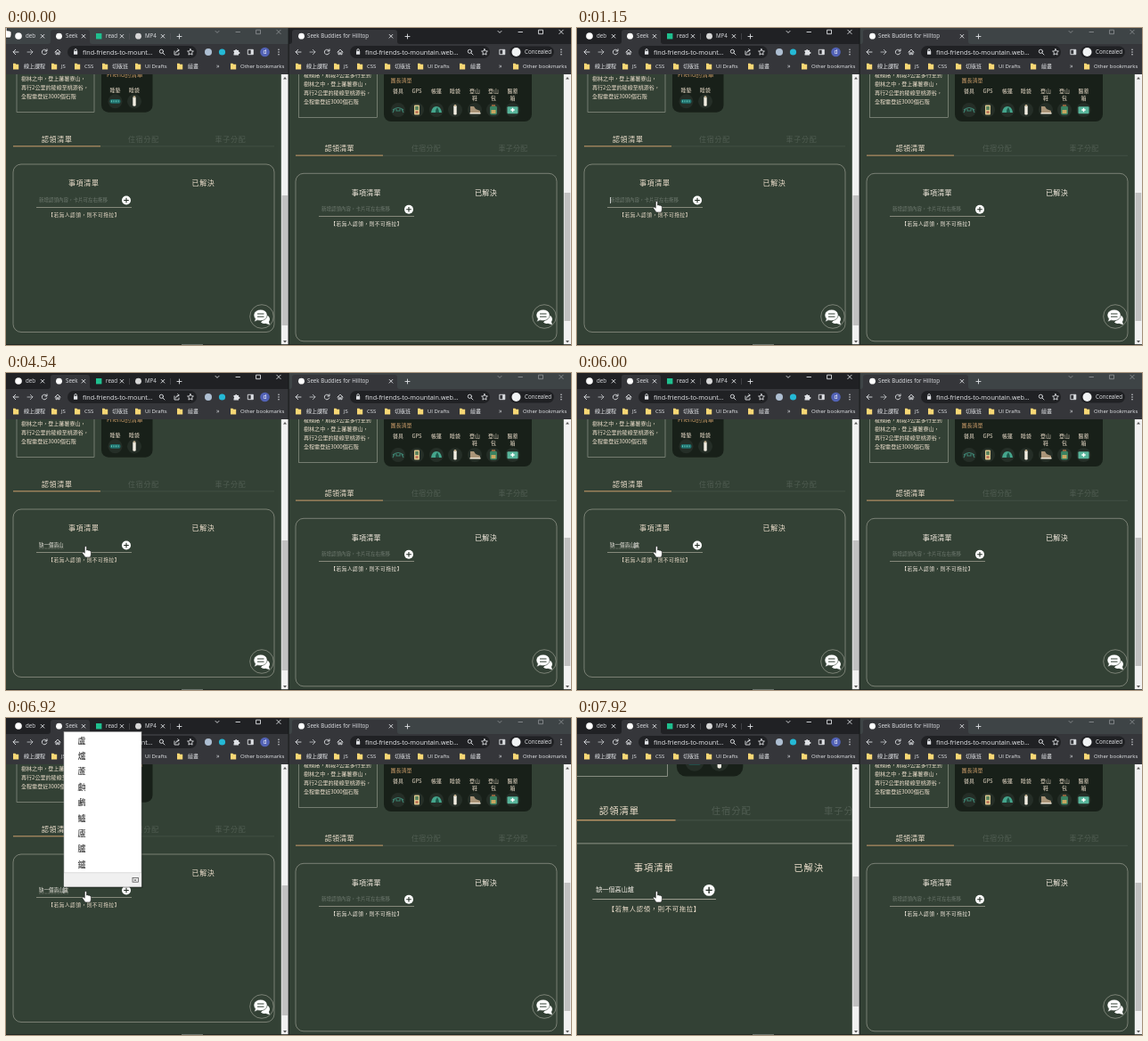
Write an HTML page that moves like this. It is 634 px wide and 356 px high and loops after 8000 ms.

```html
<!DOCTYPE html>
<html lang="zh-Hant">
<head>
<meta charset="utf-8">
<title>Shared list demo</title>
<style>
html, body { margin: 0; width: 100%; height: 100%; overflow: hidden; background: #334135; }
svg { display: block; width: 634px; height: 356px; }
text { font-family: "Open Sans", "Noto Sans CJK TC", "Noto Sans CJK", sans-serif; white-space: pre; }
.page text { font-family: "Noto Sans CJK TC", "Noto Sans CJK", sans-serif; }
.line { fill: none; stroke: #dfe1e5; stroke-width: .9; stroke-linecap: round; stroke-linejoin: round; }
</style>
</head>
<body>
<svg id="stage" viewBox="0 0 634 356"></svg>
<script>
const CREAM = '#f0e2cf', TAN = '#c79a68', DARK = '#182019', BG = '#334135', TEAL = '#45a58c', EDGE = '#a9aca0';
const BAR = '#202124', IDLE = '#3e4446', TOOL = '#35363a', GREY = '#dfe1e5';

// Shape helpers; text is placed by its vertical centre.
const rect = (x, y, w, h, fill, more = '') =>
  `<rect x="${x}" y="${y}" width="${w}" height="${h}" fill="${fill}" ${more}/>`;
const disc = (x, y, r, fill, more = '') => `<circle cx="${x}" cy="${y}" r="${r}" fill="${fill}" ${more}/>`;
const path = (d, more = 'class="line"') => `<path d="${d}" ${more}/>`;
const text = (x, y, size, str, fill = GREY, more = '') =>
  `<text x="${x}" y="${y + size * .36}" font-size="${size}" fill="${fill}" ${more}>${str}</text>`;
const mid = (x, y, size, str, fill, more = '') => text(x, y, size, str, fill, 'text-anchor="middle" ' + more);
const move = (x, y, body) => `<g transform="translate(${x} ${y})">${body}</g>`;
const cross = (x, y, r = 1.9) => path(`M${x - r} ${y - r}l${2 * r} ${2 * r}m0 ${-2 * r}l${-2 * r} ${2 * r}`);
const plus = (x, y, r = 2.5) => path(`M${x - r} ${y}h${2 * r}M${x} ${y - r}v${2 * r}`);
const folder = x => path(`M${x - 3} 39.8h2.4l1 1h2.8v5.6h-6.2z`, 'fill="#f8d775"');
const zoomIcon = x => disc(x - .6, 26.3, 2.1, 'none', 'class="line"') + path(`M${x + 1} 28l2 2`);
const star = x => path(`M${x} 23.6l1 2.2 2.4.3-1.8 1.6.5 2.4-2.1-1.2-2.1 1.2.5-2.4-1.8-1.6 2.4-.3z`);
const panel = x => path(`M${x - 2.8} 24.3h5.6v5.4h-5.6z`) + rect(x + .2, 24.3, 2.6, 5.4, GREY);

// Browser frame shared by both windows.
function chrome(id, pillWidth, url, extra) {
  const marks = [[11, 20, '線上課程'], [54, 62, 'JS'], [80, 88, 'CSS'], [111, 119, '切版班'],
    [148, 156, 'UI Drafts'], [195, 204, '繪畫'], [255, 263, 'Other bookmarks']];
  return rect(0, 0, 317, 18, BAR, `id="bar${id}"`) + rect(0, 18, 317, 34, TOOL)
    + `<g id="ctrl${id}">` + path('M235 3.4l2 2 2-2M258 4.5h4.5M281 2.2h4.5v4.5h-4.5z') + cross(306, 4.4, 2.2) + '</g>'
    + path('M14 27h-6l2.7-2.7M8 27l2.7 2.7')
    + path('M24 27h6l-2.7-2.7M30 27l-2.7 2.7', 'class="line" opacity=".75"')
    + path('M45.6 25.6a2.8 2.8 0 1 0 .2 2.4M46 23.8v2.2h-2.2')
    + path('M55 27l3-2.8 3 2.8M56 26.4v3.3h1.3v-2h1.4v2h1.3v-3.3')
    + rect(69, 20, pillWidth, 14, BAR, 'rx="7"')
    + rect(76, 26, 4.2, 3.8, GREY, 'rx=".5"') + path('M76.9 26v-1.2a1.2 1.2 0 0 1 2.4 0V26')
    + text(86, 27, 7.2, url, '#e8eaed')
    + [24.3, 27, 29.7].map(y => disc(306, y, .75, GREY)).join('')
    + marks.map(([f, x, s]) => folder(f) + text(x, 43, 6, s, '#e8eaed')).join('')
    + text(236, 42.5, 7, '»') + extra;
}

const tab = (x, str, close, icon) => icon + text(x, 9.2, 6.2, str, '#e0e2e6') + cross(close, 9.2);
const tabShape = (x, w) =>
  path(`M${x - 3} 18q3 0 3-3V5q0-3 3-3h${w - 6}q3 0 3 3v10q0 3 3 3z`, `fill="${TOOL}"`);

const leftExtra = tabShape(50, 44)
  + tab(22, 'deb', 41, disc(14, 9, 3.8, '#fff'))
  + tab(67, 'Seek', 87, disc(59.5, 9.2, 3.4, '#fff'))
  + tab(112, 'read', 130, rect(101, 6, 6.4, 6.4, '#1fc08f'))
  + tab(156, 'MP4', 176, disc(148.5, 9.2, 3.4, '#d8d8d8'))
  + path('M138.5 6v7M184.5 6v7', 'stroke="#55575b" stroke-width=".6"') + plus(194.5, 9.5)
  + zoomIcon(175) + path('M189 26v4h5v-2M190.5 28q.3-3 3.5-3m-1.3-1.3L194.2 25l-1.5 1.4') + star(207)
  + disc(227, 27, 4, '#aebfd2') + disc(242.5, 27, 3.6, '#25b9d6')
  + path('M255.5 25h1.7a1 1 0 1 1 2 0h1.8v2a1 1 0 1 1 0 1.8v1.6h-5.5v-1.8a1 1 0 0 0 0-1.8z', `fill="${GREY}"`)
  + panel(274.5) + disc(290.5, 27, 5.3, '#5262b5') + mid(290.5, 26.7, 6.5, 'd', '#fff');

const rightExtra = tabShape(4, 118)
  + tab(21, 'Seek Buddies for Hilltop', 115, disc(14.5, 9.2, 3.4, '#fff')) + plus(133.5, 9.5)
  + zoomIcon(204) + star(220) + panel(240)
  + rect(248, 20.5, 50, 13, BAR, 'rx="6.5"') + disc(255.5, 27, 5, '#f1f3f4') + text(265, 27, 6.2, 'Concealed', '#e8eaed');

const bubble = move(287, 324,
  disc(0, 0, 13.3, BG, `stroke="${EDGE}" stroke-width=".6"`)
  + path('M-1 6.5q2 2 5 1.2l5 1.6-1-3.2q2.6-4-1.4-7.3z', 'fill="#fff"')
  + path('M-1.5-7.8c4.5 0 7.6 2.6 7.6 6.1S3 4.7-1.5 4.7q-1.7 0-3-.5l-4 1.8 1.2-3.5C-11.5-2.5-7-7.8-1.5-7.8z',
    `fill="#fff" stroke="${BG}" stroke-width=".6"`)
  + path('M-5-3H2.5M-5 .2H2.5', `stroke="${BG}" stroke-width="1"`));

// Claim board: tabs, frame, headings and input line.
function board(weight, ls, head, field) {
  const w = `font-weight="${weight}" letter-spacing="${ls}"`;
  const faint = '#505d52';
  return mid(57.3, 125, 8, '認領清單', CREAM, w) + mid(154.5, 125, 8, '住宿分配', faint, w)
    + mid(252, 125, 8, '車子分配', faint, w)
    + rect(8, 132.6, 293, .6, '#4a594c') + rect(8, 132.3, 98, 1, TAN)
    + rect(8, 153, 293, 188.5, 'none', `rx="9" stroke="${EDGE}" stroke-width=".6"`)
    + mid(87.3, 174.4, 8, '事項清單', head, w) + mid(221.5, 174.4, 8, '已解決', head, w)
    + field + rect(34, 201, 107, .6, '#bdb9ab')
    + disc(135, 193.5, 5, '#fff') + path('M132.2 193.5h5.6M135 190.7v5.6', 'stroke="#222c24" stroke-width="1.1"')
    + mid(87.6, 210, 5.65, '【若無人認領，則不可拖拉】', head, `font-weight="${weight}" letter-spacing=".55"`);
}
const hint = id => text(37, 193, 5.5, '新增認領內容，卡片可左右拖移', '#6f7a70', `id="${id}"`);

function intro(x, y, w) {
  return ['稜線路，前段3公里多行至到', '樹林之中，登上蕃薯寮山，', '再行2公里的稜線至桃源谷，', '全程需登近3000個石階']
    .map((s, i) => text(x, y + i * 10, 6.05, s, CREAM, `font-weight="${w}"`)).join('');
}
function gear(x, y, names, art, dy) {
  const label = names.split('/').map((s, i) => mid(x, y + i * 8, 5.9, s, CREAM, 'font-weight="500"')).join('');
  return label + move(x, y + dy, disc(0, 0, 8, '#252e27') + art);
}
const bottle = rect(-1.7, -5, 3.4, 10.5, '#f2eee3', 'rx="1.3"') + rect(-1.2, -6, 2.4, 2, '#bfae8e');
const mat = rect(-6, -2.4, 12, 4.8, '#1f6f6c', 'rx="2"')
  + path('M-4-1v2M-1.5-1v2M1-1v2M3.5-1v2', 'stroke="#63c5b5" stroke-width="1"');
const stove = path('M-6 0q6-5 12 0M-4-1l-2 4M4-1l2 4M-2-2v3h4v-3', 'fill="none" stroke="#3d8271" stroke-width="1.1"');
const gps = rect(-3, -5.5, 6, 11, '#d8c48b', 'rx="1"') + rect(-1.8, -4, 3.6, 4, '#56805d') + rect(-1.5, 1.5, 3, 2, '#b65a48');
const tent = path('M-6 3q1-7 6-7t6 7z', `fill="${TEAL}"`) + path('M-1 3q0-4 2-6 2 3 2 6z', 'fill="#1d594a"');
const shoe = path('M-5-4h4l2 3 5 2v2H-5z', 'fill="#a99478"') + rect(-5.5, 3, 12, 1.5, '#f1e8d8');
const pack = rect(-4, -4.5, 8, 10, '#3c8262', 'rx="2"') + rect(-2.5, 0, 5, 4, '#c7a761') + rect(-2, -6, 4, 2, '#8c613d');
const kit = rect(-6, -3.8, 12, 8, '#58b59b', 'rx="1"') + path('M-2.2 0h4.4M0-2.2v4.4', 'stroke="#fff" stroke-width="1.4"');

const outline = `stroke="${EDGE}" stroke-width=".55"`;
const leftPage = rect(12, 30, 87, 64.7, 'none', outline) + intro(17, 46.5, 400)
  + rect(107, 30, 57.5, 64.7, DARK, 'rx="8"') + text(113, 52.6, 6.8, 'Friend的清單', TAN)
  + gear(122.5, 70, '睡墊', mat, 12.3) + gear(144, 70, '睡袋', bottle, 12.3)
  + board(400, .7, CREAM, hint('hint') + '<g id="entry"></g>') + bubble;

const kitList = [[123, '餐具', stove], [144, 'GPS', gps], [166, '帳篷', tent], [187, '睡袋', bottle],
  [209, '登山/鞋', shoe], [230, '登山/包', pack], [251.5, '醫藥/箱', kit]];
const rightPage = rect(11.5, 30, 88, 70.5, 'none', outline) + intro(17, 52.5, 500)
  + rect(107, 30, 166, 75, DARK, 'rx="8"') + text(114.5, 58.5, 6, '團長清單', TAN, 'font-weight="500"')
  + kitList.map(([x, s, art]) => gear(x, 71.3, s, art, 20.7)).join('')
  + move(0, 10.3, board(500, .3, '#f8efe3', hint('hint2'))) + bubble;

const scroll = (id, y, h) => rect(308.8, 52, 8.2, 304, '#f1f1f1') + rect(309.6, y, 6.6, h, '#c1c1c1', `id="${id}"`)
  + path('M311 57.5l2-2.4 2 2.4zM311 351l2 2.4 2-2.4z', 'fill="#555"');

const options = [...'盧爐蘆顱鸕鱸廬臚鑪'].map((c, i) => mid(85, 25.3 + i * 17.4, 9, c, '#222')).join('');
const popup = rect(66, 17, 87.5, 174, '#000', 'opacity=".25"')
  + rect(65, 15.5, 87, 174, '#fff', 'stroke="#a0a0a0" stroke-width=".6"')
  + rect(65.3, 174, 86.4, 15.3, '#f0f0f0') + rect(65, 173.6, 87, .5, '#bbb')
  + rect(142, 179.6, 6.6, 4.6, 'none', 'stroke="#444" stroke-width=".7"')
  + path('M143.5 181.2l2.8 1.8m0-1.8l-2.8 1.8', 'stroke="#444" stroke-width=".6"');

const hand = path('M-2-5.2q1-1.2 2 0v3.4q1-.7 1.7.2.9-.5 1.5.4 1.2-.2 1.3 1v2.7q-.1 1.6-1.2 2.9H-1.4L-4.4 1.2q-.2-1.6 1.1-1.1l1.3 1z',
  'fill="#fff" stroke="#111" stroke-width=".5"');

document.getElementById('stage').innerHTML =
  `<clipPath id="view"><rect y="52" width="308.8" height="304"/></clipPath>`
  + rect(0, 0, 634, 356, BG)
  + [[0, leftPage, 'zoom', 188, 146], [317, rightPage, 'still', 185, 144]].map(([x, body, id, y, h]) =>
    move(x, 0, `<g clip-path="url(#view)" class="page"><g id="${id}">${body}</g></g>` + scroll(id + 'Bar', y, h))).join('')
  + chrome('A', 145, 'find-friends-to-mount…', leftExtra)
  + move(317, 0, chrome('B', 157, 'find-friends-to-mountain.web…', rightExtra))
  + rect(316.6, 0, 1, 356, '#17191a') + rect(0, 355.2, 634, .8, '#1d231e') + rect(197, 355, 24, 1, '#6a726b')
  + `<g id="popup">${popup}${options}</g><g id="hand">${hand}</g>`;

// Input history: time, text, glyphs after the caret.
const typing = [[770, ''], [1620, 'ㄑ'], [1690, 'ㄑㄩ'], [1770, '缺'], [2000, '缺ㄧ'], [2150, '缺一'],
  [2300, '缺一ㄍ'], [2380, '缺一ㄍㄜ'], [3000, '缺一個'], [3310, '缺一個ㄍ'], [3460, '缺一個ㄍㄠ'],
  [3540, '缺一個高'], [3690, '缺一個高ㄕ'], [3770, '缺一個高ㄕㄢ'], [3920, '缺一個高山'],
  [4690, '缺一個高山ㄌ'], [4850, '缺一個高山ㄌㄨ'], [5080, '缺一個高山盧'], [5690, '缺一個高山盧', 1],
  [7000, '缺一個高山爐', 1], [7230, '缺一個高山爐']];
const $ = id => document.getElementById(id);
const set = (id, key, value) => $(id).setAttribute(key, value);
const clamp = (v, hi) => Math.max(0, Math.min(hi, v));
let shown;

function drawEntry(t) {
  const [at, str = '', after = 0] = typing.filter(e => e[0] <= t).pop() || [];
  const caret = at !== undefined && (t - at) % 1060 < 530;
  const key = str + after + caret + (t < 7230);
  if (key === shown) return;
  shown = key;
  const end = 37 + 5.5 * str.length;
  let out = text(37, 193, 5.5, str, '#f5f0e8');
  if (str && t < 7230) out += path(`M37 197H${end}`, 'stroke="#d8d5cb" stroke-width=".4" stroke-dasharray=".8 .6"');
  if (caret) out += rect(end - 5.5 * after, 190, .7, 7, '#fff');
  $('entry').innerHTML = out;
  set('hint', 'opacity', str ? 0 : 1);
}

function focus(id, on) {
  set('bar' + id, 'fill', on ? BAR : IDLE);
  set('ctrl' + id, 'opacity', on ? 1 : .45);
}

function frame(now) {
  const t = now % 8000;
  const p = clamp(Math.floor((t - 4) / 76), 6) / 6;
  const ease = p * p * (3 - 2 * p);
  set('hand', 'transform', `translate(${1 + 89.5 * ease} ${5 + 196 * ease}) scale(1.1)`);
  focus('A', t >= 310);
  focus('B', t < 310);
  drawEntry(t);
  set('popup', 'opacity', t < 6230 || t >= 7000 ? 0 : t < 6310 ? .6 : 1);
  const step = clamp(Math.floor((t - 7695) / 75), 3);
  const s = 1 + step * .0983;
  set('zoom', 'transform', `translate(${90.5 * (1 - s)} ${194 * (1 - s)}) scale(${s})`);
  set('zoomBar', 'y', 188 - step * 10 / 3);
  requestAnimationFrame(frame);
}
requestAnimationFrame(frame);
</script>
</body>
</html>
```
